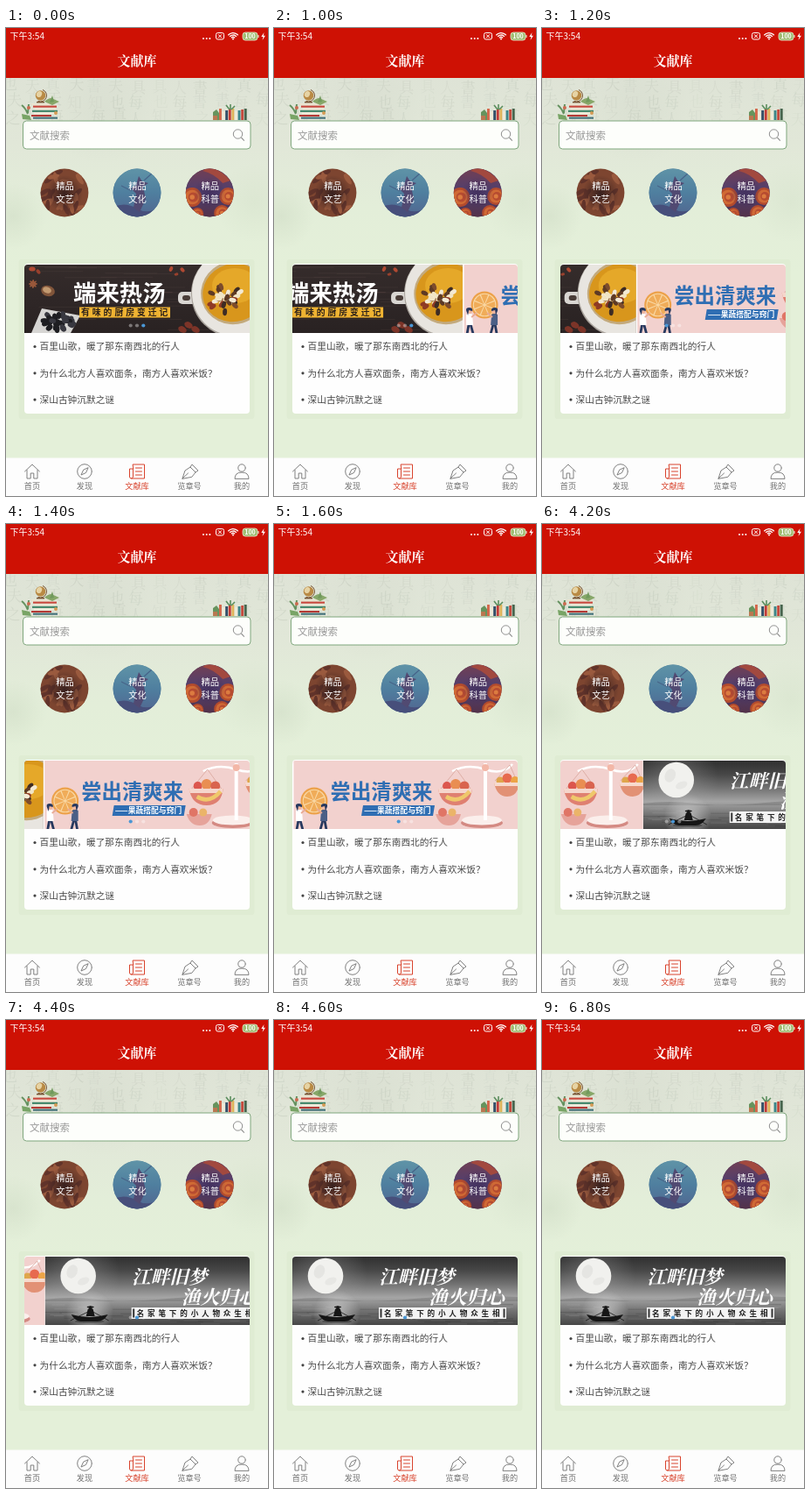
An HTML page with a canvas that plays this animation: 300 px wide and 534 px high, repeating every 9000 ms.

```html
<!DOCTYPE html>
<html lang="zh-CN">
<head>
<meta charset="utf-8">
<style>
html, body { margin: 0; width: 100%; height: 100%; overflow: hidden; background: #e4f0d9; }
canvas { display: block; width: 300px; height: 534px; }
</style>
</head>
<body>
<canvas id="stage"></canvas>
<script>
const W = 300, H = 534, LOOP = 9000;
const SANS = '"Noto Sans CJK SC", "Noto Sans CJK", "Noto Sans", sans-serif';
const SERIF = '"Noto Serif CJK SC", "Noto Serif", "Noto Sans CJK SC", serif';
const RED = '#ce1104', ACTIVE = '#d8432c', GREY = '#737373';
const BANNER = { x: 21, y: 270, w: 258, h: 78 };

const canvas = document.getElementById('stage');
const c = canvas.getContext('2d');
const scale = window.devicePixelRatio || 1;
canvas.width = W * scale;
canvas.height = H * scale;

function random(seed) {
  return () => (seed = (seed * 16807) % 2147483647) / 2147483647;
}
function rect(x, y, w, h, color) {
  c.fillStyle = color;
  c.fillRect(x, y, w, h);
}
function round(x, y, w, h, r) {
  c.beginPath();
  c.roundRect(x, y, w, h, r);
}
function fill(color) { c.fillStyle = color; c.fill(); }
function stroke(color, width = 1) {
  c.strokeStyle = color;
  c.lineWidth = width;
  c.stroke();
}
function oval(x, y, rx, ry, color, angle = 0) {
  c.beginPath();
  c.ellipse(x, y, rx, ry, angle, 0, Math.PI * 2);
  if (color) fill(color);
}
function dot(x, y, r, color) { oval(x, y, r, r, color); }
function path(d, color, width = 1) {
  c.strokeStyle = color;
  c.lineWidth = width;
  c.stroke(new Path2D(d));
}
function shape(d, color) {
  c.fillStyle = color;
  c.fill(new Path2D(d));
}
// Text is placed by its vertical middle.
function text(str, x, y, size, color, { align = 'left', style = '', family = SANS, gap = 0 } = {}) {
  c.font = `${style} ${size}px ${family}`;
  c.textAlign = align;
  c.textBaseline = 'alphabetic';
  c.letterSpacing = gap + 'px';
  c.fillStyle = color;
  c.fillText(str, x, y + size * 0.37);
  c.letterSpacing = '0px';
}
function gradient(y0, y1, ...colors) {
  const g = c.createLinearGradient(0, y0, 0, y1);
  colors.forEach((color, i) => g.addColorStop(i / (colors.length - 1), color));
  return g;
}
function glow(x, y, r, color) {
  const g = c.createRadialGradient(x, y, 0, x, y, r);
  g.addColorStop(0, color);
  g.addColorStop(1, color.replace(/[\d.]+\)$/, '0)'));
  dot(x, y, r, g);
}

function drawBackground() {
  rect(0, 56, W, H, gradient(56, 280, '#dee3d6', '#e1e7d8', '#e3eed9', '#e4f0d9'));
  const rnd = random(71);
  const signs = '也之知天真每夫書具人';
  for (let col = 0; col < 13; col++) {
    for (let row = 0; row < 3; row++) {
      const alpha = 0.03 + rnd() * 0.06;
      const sign = signs[Math.floor(rnd() * signs.length)];
      text(sign, 292 - col * 24 + rnd() * 6, 63 + row * 18 + rnd() * 5, 17,
        `rgba(70,85,75,${alpha})`, { align: 'center', family: SERIF });
    }
  }
  glow(8, 215, 38, 'rgba(165,180,155,0.18)');
  glow(285, 200, 45, 'rgba(170,185,160,0.12)');
  glow(110, 95, 60, 'rgba(170,180,165,0.1)');
}

function drawStatus() {
  rect(0, 0, W, 57, RED);
  text('下午3:54', 4.5, 9.5, 10, '#fff');
  [226, 229.7, 233.4].forEach(x => dot(x, 12, 1, '#fff'));
  round(240.5, 5.5, 9, 7.5, 2);
  stroke('#fff');
  path('M243 7.3l4 4m0-4l-4 4', '#fff');
  for (const r of [2.6, 5, 7.4]) {
    c.beginPath();
    c.arc(260, 13, r, -Math.PI * 0.78, -Math.PI * 0.22);
    stroke('#fff', 1.3);
  }
  dot(260, 12.6, 1, '#fff');
  round(271, 5, 17, 9, 3);
  fill('#9fbd72');
  stroke('#e6e9cf', 0.8);
  rect(288.3, 8, 1.2, 3, '#e6e9cf');
  text('100', 279.5, 9.5, 7, '#fff', { align: 'center', style: 'bold' });
  shape('M295.5 5l-3.2 5h2.2l-1 4 3.4-5.2h-2.2z', '#fff');
  text('文献库', 150, 37.5, 15, '#fff', { align: 'center', style: 'bold', family: SERIF });
}

function drawBooks() {
  const stack = ['#e9e3cf', '#c9473c', '#eee7d5', '#3f8468', '#f0ead8', '#b53a35', '#416f79'];
  stack.forEach((color, i) => rect(29 + (i * 2) % 5, 86 + i * 2.6, 22 + (i * 5) % 8, 2.1, color));
  dot(39.5, 77, 5.8, '#b98a45');
  oval(38, 75.5, 3, 3.6, '#e6d3a4', 0.5);
  c.beginPath();
  c.arc(39.5, 77, 7, -1.2, 2);
  stroke('#76502f');
  rect(35, 84, 9, 1.4, '#76502f');
  shape('M44 84q4-4 8-4l9 4-8 4z', '#87a769');
  shape('M50 85l3-8 2 7z', '#719a5d');
  path('M18 88q4 3 7 10M26 87l-1 10', '#659260', 2);
  shape('M18 98l9 2 2 5-10-1z', '#78a466');
  dot(26, 91, 2, '#cc6a50');
  dot(57, 97, 2, '#d49a53');
  const shelf = ['#d4674b', '#f0ead8', '#334f68', '#c33c37', '#e0b45a', '#f0ead8', '#3d8588', '#c54a3d', '#47654e'];
  shelf.forEach((color, i) => rect(244 + i * 3.6, 92 + (i * 7) % 4, 2.9, 13 - (i * 7) % 4, color));
  shape('M237 105v-9l4-3 3 4v8z', '#66935d');
  rect(237, 100, 5, 5, '#b97851');
  path('M256 93l-4-5M257 93v-6M258 93l4-4', '#5b8e5e', 1.6);
}

function drawSearch() {
  round(19.5, 106, 260.5, 32, 4);
  fill('#fdfefb');
  stroke('#7fa67d');
  text('文献搜索', 27, 122.5, 11.5, '#999');
  dot(265.5, 121, 5.2);
  stroke('#8f8f8f');
  path('M269.4 125l3.4 3.6', '#8f8f8f', 1.1);
}

function drawTopic(x, label, base, paint) {
  c.save();
  dot(x, 188, 27.4, base);
  c.clip();
  c.translate(x, 188);
  paint();
  c.restore();
  text('精品', x + 0.5, 180, 10.3, '#fff', { align: 'center' });
  text(label, x + 0.5, 195.5, 10.3, '#fff', { align: 'center' });
}
function drawTopics() {
  drawTopic(67, '文艺', '#7d4530', () => {
    const rnd = random(9);
    for (let i = 0; i < 26; i++) {
      const a = rnd() * 6.28, r = 12 + rnd() * 15;
      oval(Math.cos(a) * r, Math.sin(a) * r, 7, 2.5, i % 2 ? '#9a5a3e' : '#61332a', rnd() * 3);
    }
    glow(0, 1, 21, 'rgba(45,27,28,0.85)');
  });
  drawTopic(150, '文化', '#507f9c', () => {
    rect(-28, -28, 56, 56, gradient(-27, 27, '#5f93a7', '#4f7f9f', '#516690'));
    shape('M-27 16q14-6 27 2t27-3v14h-54z', '#474f7b');
    shape('M2-19l4 6 7 2-6 4 3 14-7 15-7-5 3-16-6-6 6-4z', '#514a72');
    path('M-18-8l12 6M8-14l9-8', '#47658a', 1.3);
  });
  drawTopic(233.2, '科普', '#54405f', () => {
    rect(-28, -28, 56, 56, gradient(-27, 27, '#713f54', '#4e3f70', '#53324a'));
    for (const [x, y, r] of [[-20, 5, 11], [21, 4, 10], [14, 23, 9], [-14, 24, 7]]) {
      dot(x, y, r, '#b34b2d');
      dot(x, y, r * 0.76, '#d06a35');
      dot(x + 1, y, r * 0.5, '#b64b30');
      dot(x, y, r * 0.25, '#dc7b40');
    }
    shape('M-8-25q13 3 23 14l9-3q-13-14-26-15z', '#a2493f');
    glow(0, 0, 18, 'rgba(64,44,88,0.7)');
  });
}

function drawTableBanner() {
  rect(0, 0, 258, 78, gradient(0, 78, '#352c2b', '#2f2727', '#292222'));
  const rnd = random(23);
  for (let i = 0; i < 22; i++) rect(rnd() * 200, rnd() * 78, 60, 1, 'rgba(95,80,75,0.22)');
  const spice = [[9, 5, 2.5], [16, 8, 2], [168, 5, 2], [174, 11, 1.6], [181, 6, 2]];
  spice.forEach(([x, y, r], i) => oval(x, y, r * 1.5, r, i % 2 ? '#98402d' : '#b14932', i));
  oval(27, 30, 8, 6, '#81553a', 0.3);
  oval(26, 29, 5, 3.5, '#c29a70', 0.3);
  for (let i = 0; i < 4; i++) oval(10, 22, 5, 1.3, '#99583a', i * 0.8);
  shape('M20 50l44 8-11 20H8z', '#d6d5d3');
  for (let i = 0; i < 35; i++) {
    const a = rnd() * 6.28, r = Math.sqrt(rnd());
    oval(39 + Math.cos(a) * r * 18, 65 + Math.sin(a) * r * 10, 4, 2.8, i % 3 ? '#1e1e22' : '#383840', a);
  }
  for (const [x, y] of [[188, 69], [196, 74], [181, 74]]) oval(x, y, 5, 3.5, '#7c3428', 0.5);

  round(176, 31, 24, 14, 5);
  fill('#d9d6d2');
  round(181, 35, 9, 6, 3);
  fill('#4a3d38');
  dot(241, 33, 50, '#a9a39c');
  dot(241, 32, 49, '#e8e5e0');
  oval(240, 32, 38, 36, '#c3aa7d', -0.3);
  oval(240, 32, 36, 33, '#d8961c', -0.3);
  oval(241, 24, 26, 20, '#e5a829');
  const toppings = ['#f1e5c4', '#5d3a25', '#8f3a24', '#f3ead4', '#3e2c24', '#7d4c2c'];
  for (let i = 0; i < 34; i++) {
    const a = rnd() * 6.28, r = rnd() * 19;
    oval(231 + Math.cos(a) * r, 39 + Math.sin(a) * r * 0.8, 4.2, 2.5, toppings[i % 6], a);
  }

  text('端来热汤', 56, 32.5, 26.4, '#fff', { style: 'bold' });
  rect(63, 48.5, 104, 12, '#efb332');
  text('有味的厨房变迁记', 65, 54.5, 9.8, '#2d2119', { style: 'bold', gap: 3 });
}

function drawPerson(x, y, shirt, flip) {
  c.save();
  c.translate(x, y);
  c.scale(flip ? -1 : 1, 1);
  path('M-1 9l-2 11M1 9l3 11', '#27395f', 2.8);
  shape('M-4-2q4-3 7 0l1 12h-8z', shirt);
  path('M2 1l6-5', '#e9aa94', 1.8);
  dot(0, -6, 3, '#efb69f');
  shape('M-3-4q-3-6 2-6q5 0 4 4l-4-1-1 6z', '#27395f');
  c.restore();
}
function drawHealthBanner() {
  rect(0, 0, 258, 78, '#f2d1ce');
  rect(0, 0, 1.5, 78, '#fff');

  dot(25, 46, 15.5, '#eca14a');
  dot(25, 46, 13.3, '#f9d8a5');
  for (let i = 0; i < 8; i++) {
    const a = i * Math.PI / 4;
    c.beginPath();
    c.moveTo(25 + Math.cos(a), 46 + Math.sin(a));
    c.arc(25, 46, 12.3, a - 0.34, a + 0.34);
    fill('#f0ac59');
  }
  drawPerson(8, 59, '#fff');
  drawPerson(36, 59, '#4b5f86', true);

  text('尝出清爽来', 43.5, 35, 23.4, '#2f6eb3', { style: 'bold' });
  shape('M81 51h82l-2 12H79z', '#2f6eb3');
  text('——果蔬搭配与窍门', 82, 57, 8.8, '#fff', { style: 'bold' });

  oval(217, 71, 24, 6, '#d48a83');
  oval(217, 68, 23, 5.5, '#fbefec');
  path('M221 3v65', '#fff', 4);
  path('M183 12q18-9 38-2t31-6', '#fff', 2.5);
  path('M188 10l-18 22M188 10l16 22M249 5l-17 18M249 5l8 18', '#d8a59b', 0.8);
  dot(221, 8, 4, '#f3b7a7');
  dot(177, 29, 5, '#dc564d');
  dot(187, 27, 6, '#e98e52');
  dot(197, 29, 5.5, '#d9644f');
  shape('M167 32h39q-2 19-19 19t-20-19z', '#df8071');
  shape('M167 32h39l-1 5h-37z', '#f5d6cc');
  path('M176 41q14 9 27-6', '#efc86b', 4.5);
  dot(238, 23, 4.5, '#dfa64c');
  dot(246, 20, 5.5, '#e76a4f');
  dot(255, 23, 5, '#eca446');
  shape('M231 25h29q-2 16-14 16t-15-16z', '#e29175');
  shape('M231 25h29l-1 4h-27z', '#f7dace');
  shape('M164 61h29q-3 13-14 13t-15-13z', '#e6a39a');
  dot(172, 59, 5, '#e07566');
  dot(183, 59, 4.5, '#ebb469');
}

function drawMoonBanner() {
  rect(0, 0, 258, 78, gradient(0, 78, '#303030', '#474747', '#717171', '#a5a5a5', '#707070', '#464646'));
  glow(38, 22, 48, 'rgba(180,180,180,0.35)');
  dot(38, 22, 20.3, '#f1f1ee');
  oval(31, 17, 6, 8, '#e5e5e2', 0.4);
  oval(44, 28, 7, 4, '#e7e7e4', -0.4);
  shape('M0 49q30-4 60 0t80-1 118-2v5H0z', 'rgba(50,50,50,0.2)');
  const rnd = random(41);
  for (let i = 0; i < 34; i++) {
    const x = rnd() * 240, y = 54 + rnd() * 23;
    rect(x, y, 10 + rnd() * 28, 0.8, i % 2 ? 'rgba(205,205,205,0.18)' : 'rgba(25,25,25,0.22)');
  }
  glow(51, 65, 27, 'rgba(225,225,225,0.65)');
  oval(51, 74, 17, 2, 'rgba(25,25,25,0.4)');
  shape('M30 66q21 6 42 0q-5 8-12 8H41q-7-1-11-8z', '#161616');
  shape('M47 68l2-8q3-3 6 0l2 8z', '#161616');
  dot(52, 58, 1.8, '#161616');
  oval(52, 57.5, 4, 1, '#161616');
  path('M49 63l-20 10M55 63l18 10', '#161616', 0.8);

  const brush = { style: 'italic bold', family: SERIF };
  text('江畔旧梦', 99, 23, 21.7, '#fff', brush);
  text('渔火归心', 156, 46, 21.7, '#fff', brush);
  rect(99, 58, 146, 13, '#f3f3f3');
  rect(100.5, 59.5, 2, 10, '#333');
  rect(241.5, 59.5, 2, 10, '#333');
  text('名家笔下的小人物众生相', 105, 64.5, 8.6, '#222', { style: 'bold', gap: 3.8 });
}

const slides = [drawTableBanner, drawHealthBanner, drawMoonBanner];
const moves = [{ from: 910, to: 1600 }, { from: 3940, to: 4600 }];

// The screen refreshes ten times a second, so the slide decelerates in steps.
function slidePosition(time) {
  const now = Math.floor(time / 100) * 100;
  return moves.reduce((sum, { from, to }) => {
    const p = Math.min(1, Math.max(0, (now - from) / (to - from)));
    return sum + 1 - (1 - p) ** 2;
  }, 0);
}

function drawCard(time) {
  round(14.5, 264, 270, 182, 3);
  fill('#dfecd3');
  round(21, 269, 258, 171, 4);
  fill('#fefefe');

  const pos = slidePosition(time);
  c.save();
  round(BANNER.x, BANNER.y, BANNER.w, BANNER.h, [4, 4, 0, 0]);
  c.clip();
  slides.forEach((draw, i) => {
    const offset = (i - pos) * BANNER.w;
    if (Math.abs(offset) >= BANNER.w) return;
    c.save();
    c.translate(BANNER.x + offset, BANNER.y);
    c.beginPath();
    c.rect(0, 0, BANNER.w, BANNER.h);
    c.clip();
    draw();
    c.restore();
  });
  c.restore();

  const active = (Math.round(pos) + 2) % 3;
  for (let i = 0; i < 3; i++) {
    dot(142.7 + i * 7.3, 339.5, 2.1, i === active ? '#4a97d5' : 'rgba(255,255,255,0.38)');
  }

  const articles = [
    '百里山歌，暖了那东南西北的行人',
    '为什么北方人喜欢面条，南方人喜欢米饭？',
    '深山古钟沉默之谜'
  ];
  articles.forEach((title, i) => {
    const y = 363.5 + i * 30.3;
    dot(33, y, 1.6, '#444');
    text(title, 38.5, y, 10.7, '#484848');
  });
}

function drawNav() {
  rect(0, 490.5, W, 44, '#fdfdfd');
  ['首页', '发现', '文献库', '览章号', '我的'].forEach((label, i) => {
    text(label, 30 + i * 60, 523, 9.2, i === 2 ? ACTIVE : GREY, { align: 'center' });
  });
  c.lineJoin = c.lineCap = 'round';
  path('M21.5 506l8.5-8 8.5 8M24 504.5v9.5h4.2v-6h3.6v6H36v-9.5', GREY, 0.9);
  dot(90, 506, 8.3);
  stroke(GREY, 0.9);
  path('M94 502l-2.5 5.5-5.5 2.5 2.5-5.5z', GREY, 0.9);
  path('M145.5 498h13v16h-15q-2 0-2-2v-9h4zM145.5 503v9q0 2-2 2M148.5 502h7M148.5 506h7M148.5 510h7', ACTIVE);
  path('M202 514l3-9 6-4 6 6-4 5zM202 514l6.5-6M211 501l2-3 7 7-3 2', GREY, 0.9);
  dot(270, 502, 4.2);
  stroke(GREY, 0.9);
  path('M262 514q0-7 8-7t8 7z', GREY, 0.9);
  c.lineJoin = 'miter';
  c.lineCap = 'butt';
}

function frame() {
  c.setTransform(scale, 0, 0, scale, 0, 0);
  drawBackground();
  drawStatus();
  drawBooks();
  drawSearch();
  drawTopics();
  drawCard(performance.now() % LOOP);
  drawNav();
  requestAnimationFrame(frame);
}
frame();
</script>
</body>
</html>
```
